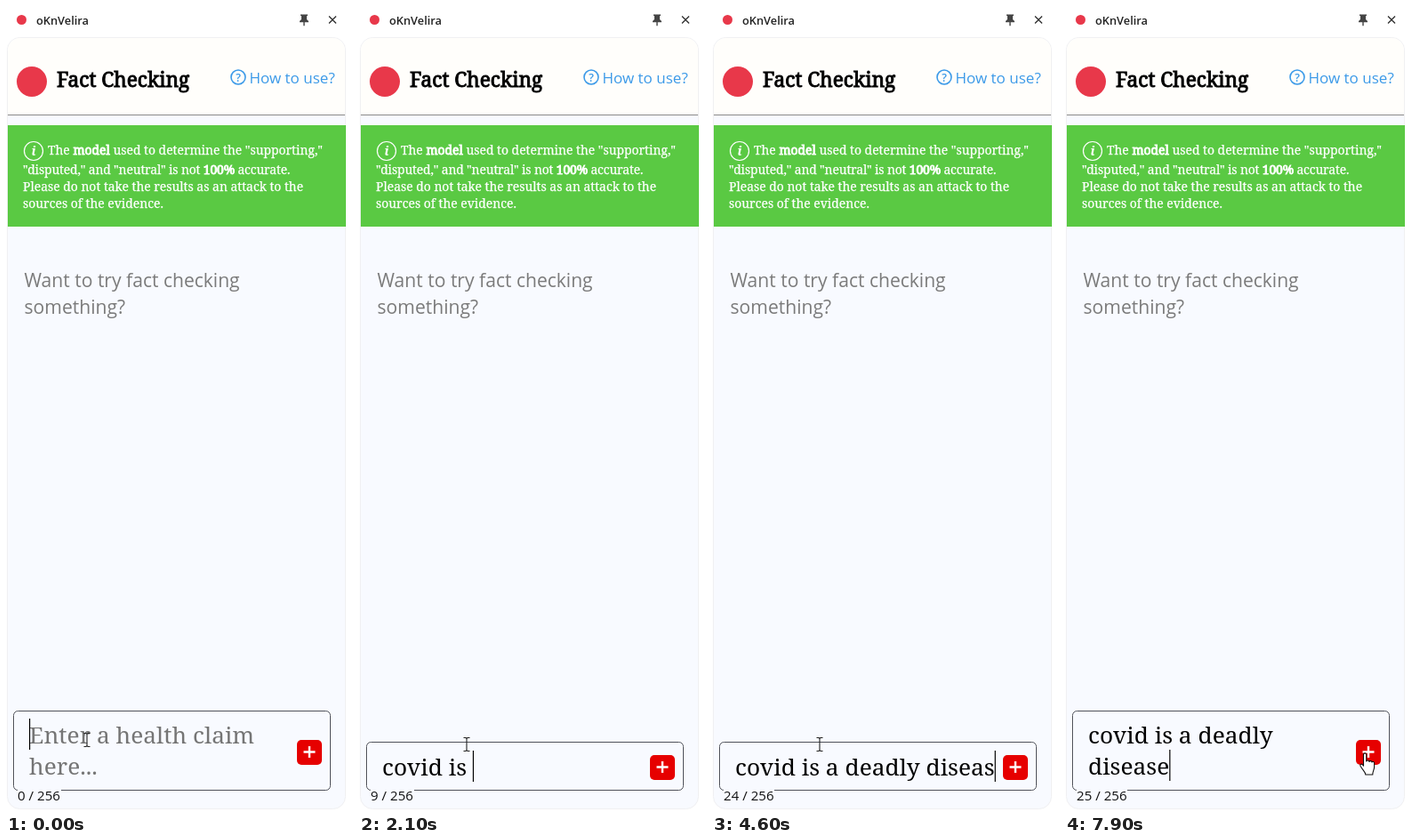
Recreate the animation shown at these times as an HTML page. Size 390 by 906 pixels, loop 8 s.

```html
<!DOCTYPE html>
<html lang="en">
<head>
<meta charset="utf-8">
<title>Fact Checking</title>
<style>
  html, body { margin: 0; width: 100%; height: 100%; overflow: hidden; background: #fff; }
  svg { display: block; width: 390px; height: 906px; }
  text { white-space: pre; }
  .slab { font-family: "Noto Serif", serif; }
  .ui { font-family: "Open Sans", "Noto Sans", sans-serif; }
  .title { font-size: 22.7px; stroke: #000; stroke-width: .9px; }
  .note { font-size: 13.9px; fill: #fff; stroke: #fff; stroke-width: .25px; }
  .note .b { stroke-width: .9px; }
  .field { font-size: 26.3px; }
  .ask { font-size: 21.1px; fill: #7b7b7b; }
</style>
</head>
<body>
<svg viewBox="0 0 390 906">
  <rect width="390" height="906" fill="#fff"/>

  <!-- title bar -->
  <circle cx="17.5" cy="15.5" r="5.5" fill="#e8384a"/>
  <text class="ui" x="34" y="21" font-size="12.8" font-weight="600" fill="#222">oKnVelira</text>
  <path d="M331 9.500h8v1.500h-1v4l2 2v1.200h-4.300v4h-1.400v-4H330V17l2-2v-4h-1z" fill="#444"/>
  <path d="M363 11.500l8 8m0-8l-8 8" stroke="#333" stroke-width="1.400"/>

  <!-- panel -->
  <rect x="1.500" y="35.500" width="380" height="867" rx="14" fill="#f8faff" stroke="#f0f0f2"/>
  <path d="M2 122V49.500a13.500 13.500 0 0 1 13.500-13.500h352a13.500 13.500 0 0 1 13.500 13.500V122z" fill="#fffefb"/>
  <path d="M2 122.500H381" stroke="#8a8a8a"/>
  <circle cx="29" cy="85" r="17" fill="#e8384a"/>
  <text class="slab title" x="57" y="90.500">Fact Checking</text>
  <circle cx="261" cy="80" r="8" fill="none" stroke="#3c9ae8" stroke-width="1.600"/>
  <text class="ui" x="261" y="84.700" font-size="12.500" font-weight="600" text-anchor="middle" fill="#3c9ae8">?</text>
  <text class="ui" x="273.500" y="87" font-size="17" fill="#3c9ae8">How to use?</text>

  <!-- notice -->
  <rect x="2" y="134" width="380" height="114" fill="#5ac943"/>
  <circle cx="31" cy="163" r="10.500" fill="none" stroke="#fff" stroke-width="1.200"/>
  <text class="slab" x="31" y="168" font-size="14.500" font-weight="700" font-style="italic" text-anchor="middle" fill="#fff">i</text>
  <g class="slab note">
    <text x="47" y="167">The <tspan class="b">model</tspan> used to determine the "supporting,"</text>
    <text x="19" y="188.500" letter-spacing="-.15">"disputed," and "neutral" is not <tspan class="b">100%</tspan> accurate.</text>
    <text x="19" y="207.500">Please do not take the results as an attack to the</text>
    <text x="19" y="227">sources of the evidence.</text>
  </g>

  <text class="ui ask" x="20.500" y="316">Want to try fact checking</text>
  <text class="ui ask" x="20.500" y="346">something?</text>

  <!-- claim field -->
  <rect id="box" x="8.500" width="356" rx="5" fill="#f8faff" stroke="#50525a"/>
  <text id="top" class="slab field" x="26" y="829"></text>
  <text id="low" class="slab field" x="26" y="864"></text>
  <rect id="caret" width="1.200" height="35" fill="#000"/>
  <g id="add">
    <rect x="327" y="-14" width="28" height="28" rx="5" fill="#e60000"/>
    <path d="M334.500-.5h13M341-7v13" stroke="#fff" stroke-width="2.400"/>
  </g>
  <rect id="gap" x="13" y="878" height="19" fill="#f8faff"/>
  <text id="count" class="ui" x="13" y="892.800" font-size="15.100" fill="#111"></text>

  <!-- pointers -->
  <path id="beam" d="M-3.500-7.500h2.500l1 1 1-1h2.500M0-6.500v13M-3.500 7.500h2.500l1-1 1 1h2.500" fill="none" stroke="#222" stroke-width="1.100"/>
  <path id="hand" d="M-1.500 1.500a1.600 1.600 0 0 1 3.200 0v7.500c.5-1.500 3-1.200 3.200.4.600-1.300 2.900-1 3 .6.700-1 2.700-.7 2.700 1v4.500c0 3-1.800 4.500-1.800 8.500h-8c0-3-3-4.700-5.800-9.700-.8-1.600 1-2.800 2.200-1.600l1.300 1.500z" fill="#fff" stroke="#111" stroke-width="1.100" stroke-linejoin="round"/>
</svg>
<script>
const $ = id => document.getElementById(id);
const LOOP = 8000, TICK = 100;
const claim = "covid is a deadly disease", wrapAt = 18;
const keys = [800, 1000, 1100, 1300, 1400, 1600, 1800, 2000, 2100, 2300, 2400, 2600, 2700,
  2800, 3000, 3200, 3400, 3600, 3800, 4000, 4100, 4300, 4400, 4600, 4800];
const caretOff = [[500, 800], [6300, 7900]];
// time, x, y
const path = [[0, 91, 825], [100, 91, 825], [500, 121, 830], [5600, 121, 830], [5700, 122, 830],
  [5900, 122, 830], [6200, 325, 831], [6400, 337, 840], [LOOP, 337, 840]];

function pointerAt(t) {
  const i = path.findIndex((p, k) => k && t <= p[0]);
  const [t0, x0, y0] = path[i - 1], [t1, x1, y1] = path[i];
  const u = (t - t0) / (t1 - t0), e = u * u * (3 - 2 * u);
  return [x0 + (x1 - x0) * e, y0 + (y1 - y0) * e];
}

const show = (el, on) => el.setAttribute("visibility", on ? "visible" : "hidden");
const move = (el, x, y) => el.setAttribute("transform", `translate(${x} ${y})`);

function draw(t) {
  const n = keys.filter(k => k <= t).length;
  const full = n === claim.length, tall = !n || full;
  const top = $("top"), low = $("low"), box = $("box");

  top.textContent = !n ? "Enter a health claim" : full ? claim.slice(0, wrapAt) : "";
  low.textContent = !n ? "here..." : claim.slice(full ? wrapAt : 0, n);
  for (const el of [top, low]) el.setAttribute("fill", n ? "#000" : "#757575");
  low.setAttribute("y", tall ? 864 : 865);
  box.setAttribute("y", tall ? 792.5 : 827.5);
  box.setAttribute("height", tall ? 89 : 54);
  move($("add"), 0, tall ? 839 : 856);

  move($("caret"), 26 + (n ? low.getComputedTextLength() : 0), !n ? 801 : full ? 836 : 837);
  show($("caret"), !caretOff.some(([a, b]) => t >= a && t < b));

  $("count").textContent = `${n} / 256`;
  $("gap").setAttribute("width", n > 9 ? 57 : 49);

  const [x, y] = pointerAt(t), over = t >= 6300;
  move($("beam"), x, y);
  move($("hand"), x, y);
  show($("beam"), !over);
  show($("hand"), over);
}

function frame() {
  const t = performance.now() % LOOP;
  draw(Math.floor(t / TICK) * TICK);
  requestAnimationFrame(frame);
}
frame();
</script>
</body>
</html>
```
